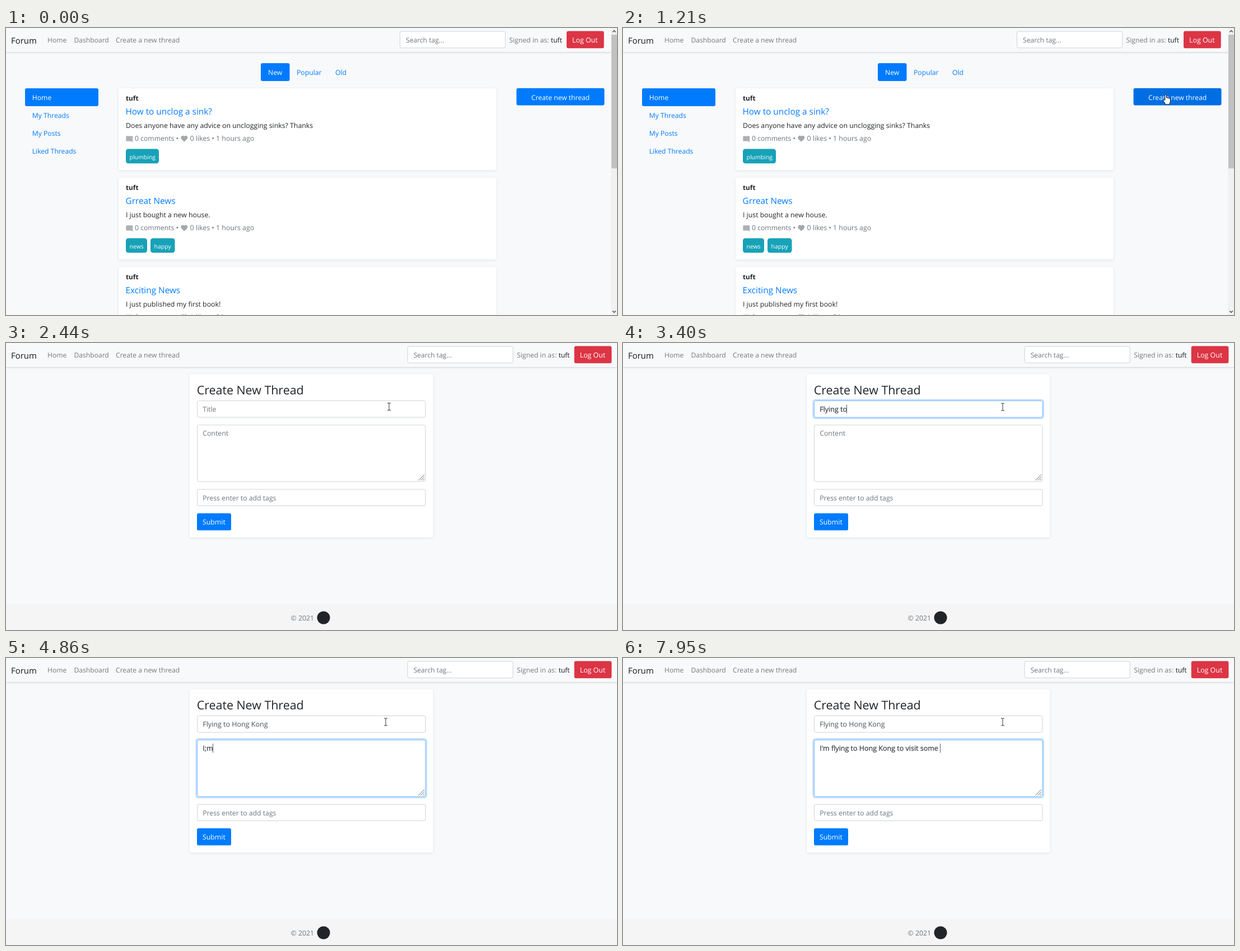
Recreate the animation shown at these times as an HTML page. Size 1091 by 514 pixels, loop 8000 ms.

```html
<!DOCTYPE html>
<html lang="en">
<head>
<meta charset="utf-8">
<title>Forum</title>
<style>
html, body { margin: 0; width: 100%; height: 100%; overflow: hidden; background: #f8f9fb; }
svg { display: block; width: 1091px; height: 514px; }
text { font-family: "Open Sans", "Noto Sans", sans-serif; white-space: pre; text-rendering: geometricPrecision; }
.card { filter: drop-shadow(0 1px 2px rgba(0, 0, 0, .09)); }
.nav { filter: drop-shadow(0 1.5px 1.5px rgba(0, 0, 0, .17)); }
</style>
</head>
<body>
<svg id="stage" viewBox="0 0 1091 514"></svg>
<script>
const BLUE = '#007bff', GREY = '#6c757d', INK = '#212529', MUTED = '#777879', LINE = '#ced4da';
const LOOP = 8000, PAGE_CHANGE = 1870, TITLE_FOCUS = 2580, BODY_FOCUS = 4240;
const USER = 'tuft';

const rect = (x, y, w, h, fill, r = 0, extra = '') =>
  `<rect x="${x}" y="${y}" width="${w}" height="${h}" rx="${r}" fill="${fill}" ${extra}/>`;
const text = (x, y, str, fill = INK, size = 12.2, extra = '') =>
  `<text x="${x}" y="${y}" fill="${fill}" font-size="${size}" ${extra}>${str}</text>`;
const field = (x, y, w, h, id = '') =>
  rect(x + .5, y + .5, w - 1, h - 1, '#fff', 3, `stroke="${LINE}" ${id && `id="${id}"`}`);
const ring = (id, y, h) =>
  rect(339.7, y - 1.3, 411, h + 2.6, 'none', 4, `id="${id}" stroke="${BLUE}" stroke-opacity=".25" stroke-width="2.6"`);

const header = shift => `
  ${rect(0, 0, 1091, 43, '#f8f9fa', 0, 'class="nav"')}
  ${text(9, 27.7, 'Forum', '#18191a', 14.9)}
  ${text(74, 26.4, 'Home', MUTED, 12.1)}
  ${text(121.5, 26.4, 'Dashboard', MUTED, 12.1)}
  ${text(196, 26.4, 'Create a new thread', MUTED, 12.15)}
  <g transform="translate(${shift})">
    ${field(703, 5.6, 189, 30.6)}
    ${text(714, 26.4, 'Search tag...', GREY, 12.1)}
    ${text(898.5, 26.4, 'Signed in as:', MUTED)}
    ${text(973, 26.4, USER, '#18191a', 12)}
    ${rect(1001, 5.6, 66.7, 30.6, '#dc3545', 3)}
    ${text(1011, 26.4, 'Log Out', '#fff', 12.4)}
  </g>`;

const bubble = '<path d="M1 0H11Q12 0 12 1V11.5L9.6 9.3H1Q0 9.3 0 8.3V1Q0 0 1 0Z" fill="#adb1b5"/>';
const heart = '<path d="M6 11L1.2 6.4C-1.6 3.2 1.2 0 3.4 0 4.6 0 5.5.6 6 1.4 6.5.6 7.4 0 8.6 0 10.8 0 13.6 3.2 10.8 6.4Z" fill="#a3a8ad"/>';

const tag = ([x, w, label]) =>
  rect(x, 108.5, w, 26, '#17a2b8', 4.5) + text(x + 6.5, 127, label, '#fff', 10.5);

const thread = (y, title, body, likes, tags) => `<g transform="translate(0 ${y})">
  ${rect(201, 0, 674.6, 146.6, '#fff', 3.2, 'class="card"')}
  ${text(214, 21.6, USER, INK, 11.8, 'font-weight="700"')}
  ${text(213.5, 46.6, title, BLUE, 15.35)}
  ${text(214, 70.6, body, INK, 12.3)}
  <g transform="translate(214.3 85.5)">${bubble}</g>
  ${text(230, 94.2, '0 comments •', GREY, 12.2)}
  <g transform="translate(312.3 84.8)">${heart}</g>
  ${text(328.5, 94.2, likes, GREY, 12.35)}
  ${tags.map(tag).join('')}</g>`;

const scrollbar = `${rect(1080, 0, 11, 514, '#f1f1f1')}${rect(1081, 12, 10, 239.5, '#c1c1c1')}
  <path d="M1083.2 7.5L1086 4.5 1088.8 7.5" fill="none" stroke="#505050" stroke-width="1.5"/>
  <path d="M1083.2 506.5L1086 509.5 1088.8 506.5" fill="none" stroke="#505050" stroke-width="1.5"/>`;

const listPage = `<g id="list">${header(0)}
  ${rect(455, 63, 51.5, 32, BLUE, 3.2)}
  ${text(468, 84.3, 'New', '#fff')}
  ${text(519, 84.3, 'Popular', BLUE)}
  ${text(588, 84.3, 'Old', BLUE)}
  ${rect(34, 108, 131, 32, BLUE, 3.2)}
  ${['Home', 'My Threads', 'My Posts', 'Liked Threads']
    .map((s, i) => text(46.8, 129.4 + 32 * i, s, i ? BLUE : '#fff', 12.15)).join('')}
  ${thread(108, 'How to unclog a sink?', 'Does anyone have any advice on unclogging sinks? Thanks',
    '0 likes • 1 hours ago', [[214, 59, 'plumbing']])}
  ${thread(268, 'Grreat News', 'I just bought a new house.',
    '0 likes • 1 hours ago', [[214, 38, 'news'], [258, 43.5, 'happy']])}
  ${thread(428, 'Exciting News', 'I just published my first book!',
    '1 likes • 2 hours ago', [])}
  ${rect(911.5, 107.8, 157, 30.6, BLUE, 3.2, 'id="create"')}
  ${text(938, 128.7, 'Create new thread', '#fff', 12.15)}
  ${scrollbar}</g>`;

const formPage = `<g id="form">${header(13.7)}
  ${rect(328, 56, 434.5, 292.3, '#fff', 3.2, 'class="card"')}
  ${text(340.7, 91.6, 'Create New Thread', INK, 21.4)}
  ${field(341, 103, 408.5, 30.6, 'titleBox')}${ring('titleRing', 103, 30.6)}
  ${field(341, 146.4, 408.5, 102.2, 'bodyBox')}${ring('bodyRing', 146.4, 102.2)}
  ${text(351.2, 123, '', GREY, 12.5, 'id="titleText"')}
  ${text(351.2, 166.3, '', GREY, 12.5, 'id="bodyText"')}
  <path d="M736.5 246L747 235.5M740.5 246L747 239.5M744.5 246L747 243.5" stroke="#666"/>
  ${field(341, 261.5, 408.5, 30.6)}
  ${text(351.2, 281.6, 'Press enter to add tags', GREY, 12.25)}
  ${rect(341, 305, 61, 30.6, BLUE, 3.2)}
  ${text(351, 325.4, 'Submit', '#fff', 12.3)}
  ${rect(0, 467, 1091, 47, '#f5f5f5')}
  ${text(508.5, 496.8, '© 2021', GREY, 12.3)}
  <circle cx="567" cy="492" r="11.5" fill="#212529"/>
  ${rect(0, 0, 1, 16.5, '#5c6064', 0, 'id="caret"')}</g>`;

const pointers = `<g id="pointer" stroke-linejoin="round" stroke="#111">
  <path id="arrow" d="M0 0V13L3 10.3 5 14.6 7.2 13.6 5.3 9.5H9.3Z" fill="#fff" stroke-width=".8"/>
  <path id="hand" d="M-1.3 1Q0-1 1.4 1V6Q3 5 4 6.6 5.6 5.6 6.3 7.2 8.4 6.6 8.4 8.8V12.5Q8 15 6.8 16.5V18H-.8V16.6L-3.8 12Q-5.2 9.6-3.8 9.2-2.6 9-1.3 10.8Z" fill="#fff"/>
  <path id="beam" d="M-3-6.5H-1Q0-6.5 0-5.5 0-6.5 1-6.5H3M0-6V6M-3 6.5H-1Q0 6.5 0 5.5 0 6.5 1 6.5H3" fill="none" stroke="#333"/></g>`;

document.getElementById('stage').innerHTML = listPage + formPage + pointers;
const $ = Object.fromEntries([...document.querySelectorAll('[id]')].map(e => [e.id, e]));

// time, x, y
const path = [
  [90, 1076, 500], [180, 1052, 462], [270, 1026, 418], [360, 1003, 366], [450, 984, 260],
  [520, 968, 172], [590, 963, 130], [700, 962, 100], [810, 963, 82],
  [910, 964, 88], [1000, 966, 100], [1100, 968, 113], [1190, 969, 119],
  [1960, 948, 118], [2050, 890, 115], [2150, 810, 112], [2250, 740, 112],
  [2340, 700, 113], [2440, 684, 114], [2540, 678, 114.5]
];

// first key time, last key time, keys ("<" deletes)
const titleKeys = [[2780, 3400, 'Flying to'], [3510, 4190, ' Hong Kong']];
const bodyKeys = [
  [4560, 4860, 'I;m'], [4900, 5040, "<<'"], [5090, 5890, 'm flying t'],
  [5910, 6280, 'o Hong'], [6320, 6710, ' Kong to '],
  [6770, 7200, 'visti s'], [7290, 7520, '<<<<'], [7620, 7950, 'it some ']
];

function typed(runs, t) {
  let out = '';
  for (const [from, to, keys] of runs)
    [...keys].forEach((key, i) => {
      if (t < from + (to - from) * i / (keys.length - 1) - .5) return;
      out = key === '<' ? out.slice(0, -1) : out + key;
    });
  return out;
}

const clamp = v => Math.max(0, Math.min(1, v));
const fade = (t, start) => clamp((t - start) / 150);
const mix = (a, b, k) => `rgb(${a.map((v, i) => v + (b[i] - v) * k)})`;
const show = (el, on) => el.setAttribute('display', on ? 'inline' : 'none');

function drawField(name, value, hint, focus) {
  const label = $[name + 'Text'];
  const color = value ? mix([73, 80, 87], [56, 62, 70], focus) : GREY;
  label.textContent = value || hint;
  label.setAttribute('font-size', value ? 12.5 : 12.3);
  label.setAttribute('fill', color);
  // focused text is rendered slightly heavier
  label.setAttribute('stroke', color);
  label.setAttribute('stroke-width', value ? .25 * focus : 0);
  $[name + 'Ring'].setAttribute('opacity', focus);
  $[name + 'Box'].setAttribute('stroke', mix([206, 212, 218], [128, 189, 255], focus));
}

function drawPointer(t) {
  const spot = path.filter(p => p[0] <= t).pop();
  show($.pointer, spot);
  if (!spot) return;
  const [, x, y] = spot;
  const onForm = t >= PAGE_CHANGE;
  const inField = onForm && x < 749 && y > 103;
  const onButton = !onForm && t < 1670 && y > 108 && y < 138;
  $.pointer.setAttribute('transform', `translate(${x} ${y})`);
  show($.beam, inField);
  show($.hand, onButton);
  show($.arrow, !inField && !onButton);
}

function drawForm(t) {
  const title = typed(titleKeys, t), body = typed(bodyKeys, t);
  const inBody = t >= BODY_FOCUS;
  drawField('title', title, 'Title', fade(t, TITLE_FOCUS) * (1 - fade(t, BODY_FOCUS)));
  drawField('body', body, 'Content', fade(t, BODY_FOCUS));
  const label = inBody ? $.bodyText : $.titleText;
  const width = (inBody ? body : title) ? label.getComputedTextLength() : 0;
  $.caret.setAttribute('x', Math.round(350.6 + width));
  $.caret.setAttribute('y', inBody ? 153.3 : 110);
  show($.caret, t >= TITLE_FOCUS);
}

function draw(t) {
  const onForm = t >= PAGE_CHANGE;
  show($.list, !onForm);
  show($.form, onForm);
  if (onForm) drawForm(t);
  else {
    const hover = fade(t, 450) - fade(t, 700) + fade(t, 1100);
    const press = fade(t, 1520);
    $.create.setAttribute('fill', mix([0, 123, 255], [0, 105 - 7 * press, 217 - 13 * press], hover));
  }
  drawPointer(t);
}

const start = performance.now();
function tick() {
  draw((performance.now() - start) % LOOP);
  requestAnimationFrame(tick);
}
tick();
</script>
</body>
</html>
```
